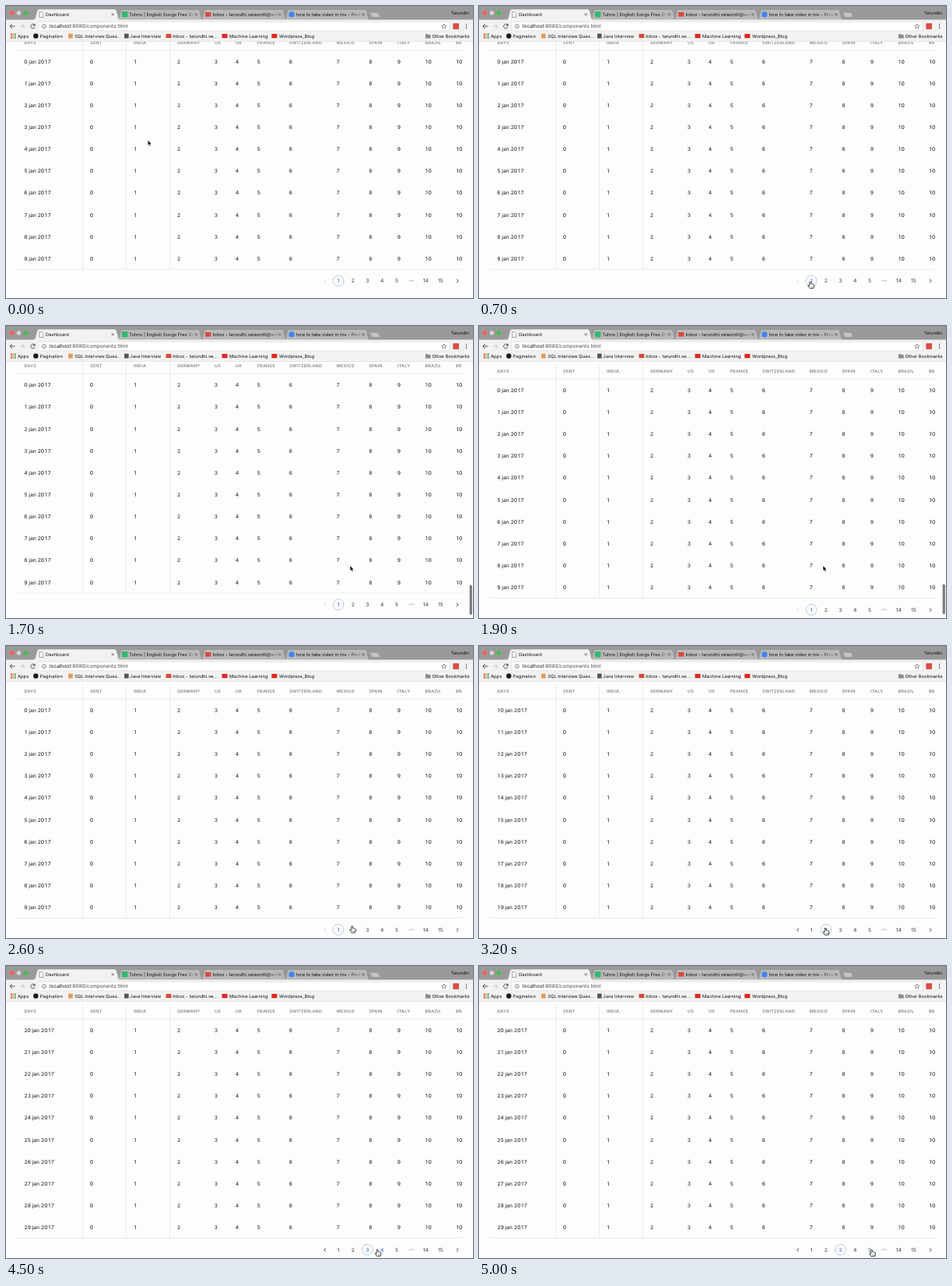
Recreate the animation shown at these times as an HTML page with a canvas. Size 600 by 375 pixels, loop 5100 ms.

```html
<!DOCTYPE html>
<html lang="en">
<head>
<meta charset="utf-8">
<title>Dashboard</title>
<style>
html, body { margin: 0; width: 100%; height: 100%; overflow: hidden; background: #fdfdfd; }
canvas { display: block; width: 600px; height: 375px; }
</style>
</head>
<body>
<canvas id="stage"></canvas>
<script>
const W = 600, H = 375, LOOP = 5100, STEP = 100;
const FONT = 'Inter, Roboto, sans-serif';
const canvas = document.getElementById('stage');
const ctx = canvas.getContext('2d');
const dpr = window.devicePixelRatio || 1;
canvas.width = W * dpr;
canvas.height = H * dpr;

const columns = [
  ['DAYS', 23.5], ['SENT', 108], ['INDIA', 164], ['GERMANY', 220], ['US', 268],
  ['UK', 295], ['FRANCE', 322.7], ['SWITZERLAND', 364], ['MEXICO', 424.7],
  ['SPAIN', 466.3], ['ITALY', 503], ['BRAZIL', 538.5], ['BR', 578]
];
const tabs = ['Dashboard', 'Tuhno | English Songs Free Download',
  'Inbox - tarundhi.velasmiti@webmail', 'how to take video in tov - Finder Search'];
const pages = [['1', 427], ['2', 445.8], ['3', 464.4], ['4', 483.2], ['5', 502],
  ['14', 539.4], ['15', 558.3]];

// Keyframes: time, value(s)
const pointerPath = [
  [200, 182.5, 172.8], [300, 260, 240], [400, 370, 318], [500, 425, 351],
  [600, 425, 351], [900, 427, 359], [1200, 430, 351], [1300, 438, 325],
  [1400, 442.3, 308.3], [1900, 442.3, 308.3], [2200, 443, 340], [2300, 444, 355],
  [2800, 445, 362], [3400, 445, 362], [4000, 463.4, 363.6], [4300, 463.4, 363.6],
  [4900, 504.5, 364]
];
const scrollPath = [[1600, 0], [1700, 4.7], [1800, 9], [1900, 11.3]];
const barPath = [[1600, 0], [1700, 1], [2300, 1], [2600, 0]];

function along(path, t) {
  if (t <= path[0][0]) return path[0].slice(1);
  for (let i = 1; i < path.length; i++) {
    const a = path[i - 1], b = path[i];
    if (t <= b[0]) {
      const k = (t - a[0]) / (b[0] - a[0]);
      return a.slice(1).map((v, j) => v + (b[j + 1] - v) * k);
    }
  }
  return path[path.length - 1].slice(1);
}

function text(s, x, y, size, color, { weight = 400, align = 'left', spacing = 0 } = {}) {
  ctx.font = `${weight} ${size}px ${FONT}`;
  ctx.letterSpacing = spacing + 'px';
  ctx.textAlign = align;
  ctx.fillStyle = color;
  ctx.fillText(s, x, y + size * 0.364);
}

// Text whose digits all share the advance of a zero
function tabular(s, x, y, size, color, weight) {
  ctx.font = `${weight} ${size}px ${FONT}`;
  ctx.letterSpacing = '0px';
  ctx.textAlign = 'center';
  ctx.fillStyle = color;
  const cell = ctx.measureText('0').width;
  for (const ch of s) {
    const w = ch >= '0' && ch <= '9' ? cell : ctx.measureText(ch).width;
    ctx.fillText(ch, x + w / 2, y + size * 0.364);
    x += w;
  }
}

function rect(x, y, w, h, color) {
  ctx.fillStyle = color;
  ctx.fillRect(x, y, w, h);
}

function disc(x, y, r, color) {
  ctx.fillStyle = color;
  ctx.beginPath();
  ctx.arc(x, y, r, 0, 7);
  ctx.fill();
}

function ring(x, y, r, color, width) {
  ctx.strokeStyle = color;
  ctx.lineWidth = width;
  ctx.beginPath();
  ctx.arc(x, y, r, 0, 7);
  ctx.stroke();
}

function line(points, color, width) {
  ctx.strokeStyle = color;
  ctx.lineWidth = width;
  ctx.beginPath();
  points.forEach(([x, y]) => ctx.lineTo(x, y));
  ctx.stroke();
}

function shape(path, fill, stroke, width) {
  ctx.fillStyle = fill;
  ctx.strokeStyle = stroke;
  ctx.lineWidth = width;
  ctx.fill(path);
  ctx.stroke(path);
}

function drawTab(i) {
  const x = 36 + i * 107.2, active = i === 0;
  const fill = active ? '#f2f2f2' : '#b9b9b9';
  shape(new Path2D(`M${x} 18 C${x + 3} 17.5 ${x + 3} 4.5 ${x + 6} 4.5
    H${x + 104} C${x + 107} 4.5 ${x + 107} 17.5 ${x + 110} 18`), fill, active ? '#d8d8d8' : '#858585', 0.5);
  const tx = x + 15, fade = ctx.createLinearGradient(tx + 70, 0, tx + 85, 0);
  fade.addColorStop(0, '#111');
  fade.addColorStop(1, 'rgba(17,17,17,0)');
  text(tabs[i], tx, 10.7, 5.8, fade);
  const ix = x + 9.3;
  if (active) {
    shape(new Path2D(`M${ix - 2.4} 7.5 h3 l2 2 v5 h-5z`), '#fff', '#666', 0.6);
  } else if (i === 1) rect(ix - 3.5, 7, 7.4, 7.4, '#35b873');
  else if (i === 2) rect(ix - 3.6, 8, 7.2, 5.6, '#d9483b');
  else disc(ix, 10.8, 3.6, '#4285f4');
  const cx = x + 101.3;
  line([[cx - 1.6, 9.2], [cx + 1.6, 12.4]], '#444', 0.7);
  line([[cx + 1.6, 9.2], [cx - 1.6, 12.4]], '#444', 0.7);
}

function drawToolbar() {
  rect(0, 17.6, W, 27.7, '#f2f2f2');
  line([[11.5, 26], [5, 26]], '#444', 0.9);
  line([[8, 23], [5, 26], [8, 29]], '#444', 0.9);
  line([[17.5, 26], [24, 26]], '#c2c2c2', 0.9);
  line([[21, 23], [24, 26], [21, 29]], '#c2c2c2', 0.9);
  ctx.strokeStyle = '#444';
  ctx.lineWidth = 0.9;
  ctx.beginPath();
  ctx.arc(34.5, 26, 2.8, 0.4, 5.6);
  ctx.stroke();
  shape(new Path2D('M37.5 22.7v2.8h-2.8z'), '#444', '#444', 0.2);

  ctx.beginPath();
  ctx.roundRect(42, 20.3, 528, 11.4, 1.5);
  ctx.fillStyle = '#fff';
  ctx.fill();
  ctx.strokeStyle = '#d0d0d0';
  ctx.lineWidth = 0.5;
  ctx.stroke();
  ring(49, 26, 2.6, '#555', 0.6);
  rect(48.7, 25.5, 0.7, 2, '#555');
  rect(48.7, 24.3, 0.7, 0.7, '#555');
  const host = 'localhost';
  text(host, 56, 26, 6.45, '#111');
  text(':8080/components.html', 56 + ctx.measureText(host).width, 26, 6.45, '#444');

  ctx.beginPath();
  for (let i = 0; i < 10; i++) {
    const a = -Math.PI / 2 + i * Math.PI / 5, r = i % 2 ? 1.4 : 3.3;
    ctx.lineTo(562.8 + r * Math.cos(a), 26.2 + r * Math.sin(a));
  }
  ctx.closePath();
  ctx.strokeStyle = '#555';
  ctx.lineWidth = 0.6;
  ctx.stroke();
  rect(574.3, 22.2, 7.6, 7.6, '#dc4a42');
  for (let i = -1; i < 2; i++) disc(591.5, 26 + i * 2.4, 0.75, '#444');
}

function drawBookmarks() {
  const y = 38.5;
  const hues = ['#e0503f', '#e9a23b', '#4a8f5c', '#4c7fd0'];
  for (let i = 0; i < 9; i++) {
    const row = Math.floor(i / 3);
    rect(6 + (i % 3) * 2.4, y - 3.3 + row * 2.4, 1.8, 1.8, hues[(i + row) % 4]);
  }
  disc(38.3, y, 3.2, '#1b1b1b');
  rect(80, y - 3, 5.6, 6, '#e39a57');
  rect(152, y - 3, 5.6, 6, '#555');
  rect(205.5, y - 2.7, 6.8, 5.2, '#d9483b');
  rect(277.5, y - 2.7, 7, 5.4, '#dc2a20');
  rect(341.3, y - 2.7, 7, 5.4, '#dc2a20');
  shape(new Path2D(`M539.3 ${y - 2.2}h2.2l.8 .9h3v4h-6z`), '#8a8a8a', '#777', 0.5);
  [['Apps', 15], ['Pagination', 43.8], ['SQL Interview Ques...', 88.2], ['Java Interview', 159.3],
    ['Inbox - tarundhi.ve...', 214.3], ['Machine Learning', 287], ['Wordpress_Blog', 351],
    ['Other Bookmarks', 547.6]].forEach(([s, x]) => text(s, x, y, 5.85, '#111'));
  rect(0, 45, W, 0.5, '#d2d2d2');
}

function drawBrowser() {
  rect(0, 0, W, 18, '#999');
  ['#fc5b57', '#d6d6d6', '#34c648'].forEach((c, i) => disc(7.4 + i * 9.1, 9, 2.8, c));
  for (let i = 3; i >= 0; i--) drawTab(i);
  shape(new Path2D('M467.5 8.2h9.5q1 0 1.5 1l2.3 5.2h-9.7q-1 0-1.5-1z'), '#c4c4c4', '#858585', 0.5);
  text('Tarundhi', 571.5, 9.3, 5.7, '#111');
  drawToolbar();
  drawBookmarks();
}

function drawTable(dy, first) {
  ctx.save();
  ctx.beginPath();
  ctx.rect(13, 45.3, 573, 330);
  ctx.clip();
  [98, 154, 210].forEach(x => rect(x, 37 + dy, 1, 301, '#ececec'));
  rect(13, 56.2 + dy, 573, 0.7, '#e6e6e6');
  rect(13, 337.9 + dy, 573, 0.7, '#e6e6e6');
  columns.forEach(([name, x]) => text(name, x, 46.7 + dy, 5.4, '#858585', { weight: 600, spacing: 0.25 }));
  for (let r = 0; r < 10; r++) {
    const y = 71.2 + dy + r * 28.14;
    columns.forEach(([, x], c) => {
      const value = c ? String(Math.min(c - 1, 10)) : `${first + r} jan 2017`;
      tabular(value, x - 0.2, y, 6.65, '#333', 500);
    });
  }
  ctx.restore();
}

function drawPager(y, current, hovered) {
  const chevron = (x, d, color) => line([[x - d, y - 2], [x + d, y + 0.2], [x - d, y + 2.4]], color, 0.9);
  chevron(409.8, -1.1, current > 1 ? '#333' : '#d0d0d0');
  chevron(580, 1.1, '#333');
  pages.forEach(([label, x], i) => {
    const on = i + 1 === current;
    if (on) ring(x, y, 6.9, '#9db2e2', 0.7);
    text(label, x, y, 6.65, on || i === hovered ? '#3f74d1' : '#555', { align: 'center', weight: 500 });
  });
  for (let i = -1; i < 2; i++) disc(520.8 + i * 2.3, y - 0.2, 0.6, '#666');
}

const arrow = new Path2D('M0 0V5.6L1.4 4.4L2.3 6.6L3.2 6.2L2.3 4.1H4.1Z');
const hand = new Path2D(`M-.9 .8Q0-.5 .9 .8V3.2Q2 2.7 2.4 3.6Q3.5 3.1 3.8 4Q4.9 3.8 4.9 5
  Q4.9 7 4 9H-.6Q-1.6 7.2-3.1 5.4Q-2.7 4.2-.9 5.7Z`);

function drawPointer(x, y, overPage) {
  ctx.save();
  ctx.translate(x, y);
  if (overPage) {
    shape(hand, '#fff', '#111', 0.8);
    [1.2, 2.4, 3.5].forEach(k => line([[k, 6], [k, 7.8]], '#333', 0.4));
  } else {
    ctx.lineJoin = 'round';
    shape(arrow, '#111', '#fff', 0.8);
    ctx.fill(arrow);
  }
  ctx.restore();
}

function draw(t) {
  ctx.setTransform(dpr, 0, 0, dpr, 0, 0);
  ctx.textBaseline = 'alphabetic';
  ctx.textRendering = 'geometricPrecision';
  const [dy] = along(scrollPath, t);
  const [bar] = along(barPath, t);
  const [px, py] = along(pointerPath, t);
  const current = t < 3000 ? 1 : t < 4200 ? 2 : 3;
  const pageY = 353 + dy;
  const hovered = Math.abs(py - pageY) < 9.5 ? pages.findIndex(p => Math.abs(p[1] - px) < 7.5) : -1;

  rect(0, 0, W, H, '#fdfdfd');
  drawTable(dy, (current - 1) * 10);
  drawPager(pageY, current, hovered);
  drawBrowser();
  if (bar > 0) {
    ctx.globalAlpha = bar;
    ctx.fillStyle = '#7c7c7c';
    ctx.beginPath();
    ctx.roundRect(595.6, 333 - dy / 8, 3.3, 38.4, 1.6);
    ctx.fill();
    ctx.globalAlpha = 1;
  }
  drawPointer(px, py, hovered >= 0);
}

const start = performance.now();
function tick() {
  const t = (performance.now() - start) % LOOP;
  draw(Math.floor(t / STEP) * STEP);
  requestAnimationFrame(tick);
}
tick();
</script>
</body>
</html>
```
